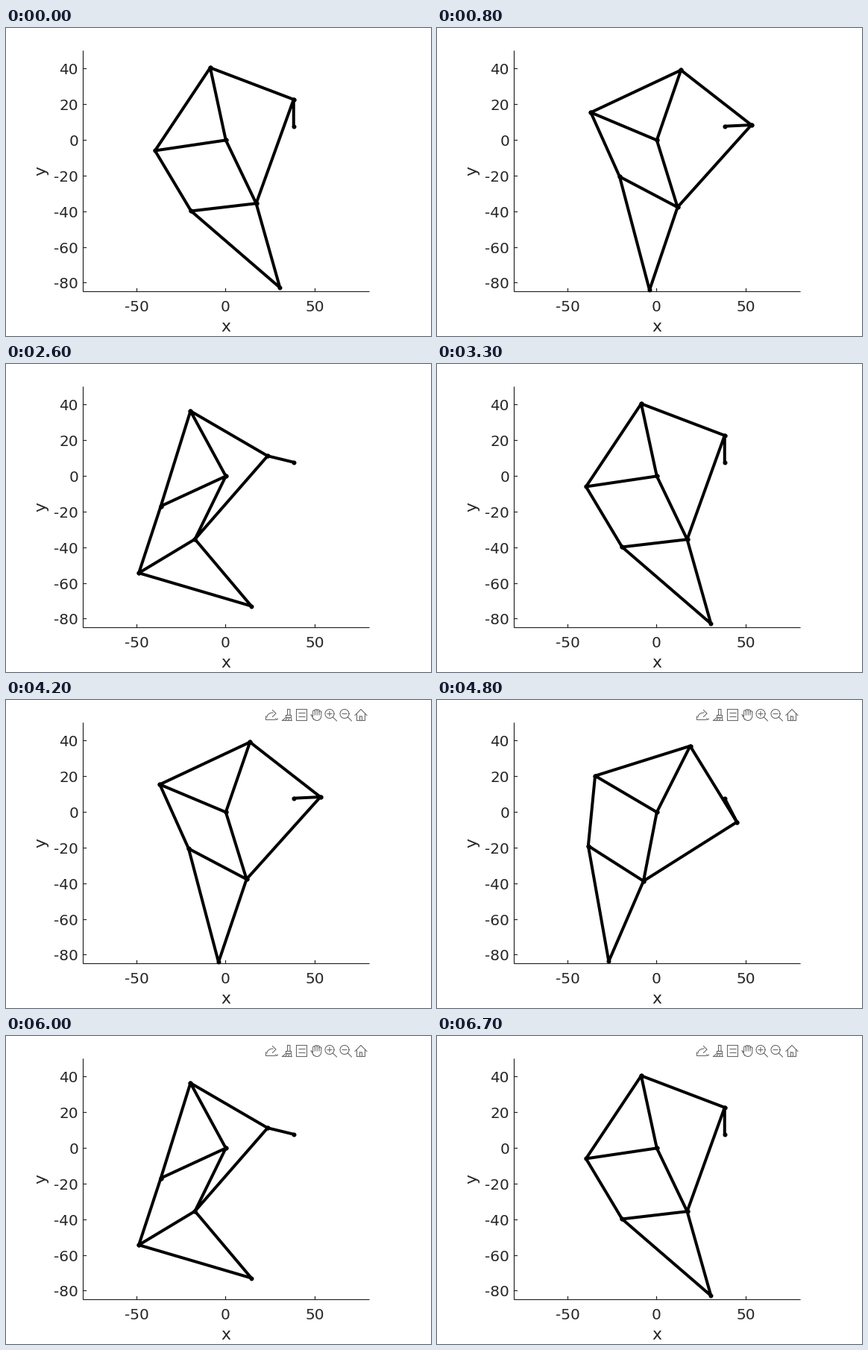
These frames come from a looping animation (570 px wide and 413 px high, 6800 ms). A matplotlib script:

```python
import numpy as np
import matplotlib.pyplot as plt
from matplotlib.animation import FuncAnimation

W, H, DPI = 570, 413, 100
PX = 72 / DPI                     # one pixel in points
X0, Y0, SCALE = 294.8, 150.4, 2.394
LEFT, RIGHT, TOP, BOTTOM = 103.5, 487, 31, 353.5
INK, ICON = "#262626", "#6a6a6a"
TURN = 34                         # steps per turn, both ends included

fig = plt.figure(figsize=(W / DPI, H / DPI), dpi=DPI, facecolor="white")
ax = fig.add_axes([0, 0, 1, 1])
ax.set_xlim(0, W)
ax.set_ylim(H, 0)
ax.axis("off")


def stroke(xs, ys, color=INK, width=1.2, **kw):
    return ax.plot(xs, ys, color=color, lw=width * PX, snap=False, **kw)[0]


def label(x, y, text, size=20, **kw):
    ax.text(x, y, text, color=INK, family="DejaVu Sans", fontsize=size * PX,
            va="baseline", **kw)


def draw_axes():
    stroke([LEFT, LEFT, RIGHT], [TOP, BOTTOM, BOTTOM],
           solid_joinstyle="miter")
    for v in (-50, 0, 50):
        x = np.floor(X0 + SCALE * v) + 0.5
        stroke([x, x], [BOTTOM, BOTTOM - 4])
        label(x, 380.5, str(v), ha="center")
    for v in range(-80, 41, 20):
        y = np.floor(Y0 - SCALE * v) + 0.5
        stroke([LEFT, LEFT + 4], [y, y])
        label(97, y + 7.3, str(v), ha="right")
    label(294.5, 407, "x", 22, ha="center")
    label(53, 192, "y", 22, ha="center", rotation=90, rotation_mode="anchor")


class Toolbar:
    """Row of line icons, each drawn around its own centre."""

    def __init__(self, x, y, step):
        self.x, self.y, self.parts = x, y, []
        for icon in (self.share, self.brush, self.note, self.hand,
                     self.zoom_in, self.zoom_out, self.home):
            icon()
            self.x += step

    def line(self, *pts):
        xs, ys = np.array(pts).T
        self.parts.append(stroke(self.x + xs, self.y + ys, ICON, 1.1))

    def box(self, l, t, r, b):
        self.line((l, t), (r, t), (r, b), (l, b), (l, t))

    def arc(self, x, y, rx, ry, start=0, end=360):
        t = np.radians(np.linspace(start, end, 40))
        self.line(*zip(x + rx * np.cos(t), y + ry * np.sin(t)))

    def share(self):
        self.line((-7.5, 2), (-7.5, 6.5), (5, 6.5))
        self.arc(2, 3, 8, 6, 180, 270)
        self.line((1.5, -6.5), (6, -2), (1.5, 2.5))
        self.line((5.5, 5), (7, 6.5), (8.5, 5))

    def brush(self):
        self.box(1.5, -7.5, 5, 0.5)
        self.box(-0.5, 0.5, 6.5, 3.5)
        for k in range(4):
            self.line((-0.5 + 2.2 * k, 3.5), (-5.5 + 4.2 * k, 7.5))
        self.line((-5.5, 7.5), (7.2, 7.5))

    def note(self):
        self.box(-6.5, -7.5, 7.5, 7.5)
        for y in (-2.5, 2.5):
            self.line((-3, y), (5, y))

    def hand(self):
        for k in range(4):
            x, y = -3 + 2.8 * k, -6.2 + 0.8 * (k - 1.3) ** 2
            self.arc(x, y, 1.4, 1.3, 180, 360)
            self.line((x + 1.4, y), (x + 1.4, 0))
        self.line((-4.4, -4), (-4.4, 2), (-7, -0.5), (-3.5, 6))
        self.arc(1, 1, 5.8, 6.5, 0, 140)

    def zoom_out(self):
        self.arc(-2, -1.5, 6, 6)
        self.line((2.3, 2.8), (7.5, 8))
        self.line((-5, -1.5), (1, -1.5))

    def zoom_in(self):
        self.zoom_out()
        self.line((-2, -4.5), (-2, 1.5))

    def home(self):
        self.line((-8, 0.5), (0, -7.5), (8, 0.5))
        self.line((-5.5, -1.5), (-5.5, 7.5), (5.5, 7.5), (5.5, -1.5))
        self.box(-1.5, 2, 1.5, 7.5)


def meet(p, r, q, s):
    """Crossing of circles (p, r) and (q, s) on the left of p -> q."""
    d = q - p
    n = np.hypot(*d)
    u = d / n
    a = (r * r - s * s + n * n) / (2 * n)
    return p + a * u + np.sqrt(r * r - a * a) * np.array([-u[1], u[0]])


PIVOT = np.array([38, 7.8])
ORIGIN = np.zeros(2)
GAP = np.full(2, np.nan)


def linkage(angle):
    crank = PIVOT + 15 * np.array([np.cos(angle), np.sin(angle)])
    top = meet(ORIGIN, 41.5, crank, 50)
    knee = meet(crank, 61.9, ORIGIN, 39.3)
    back = meet(ORIGIN, 40.1, top, 55.8)
    ankle = meet(knee, 36.7, back, 39.4)
    foot = meet(knee, 49, ankle, 65.7)
    pts = np.array([PIVOT, crank, top, back, ankle, foot, knee, crank, GAP,
                    top, ORIGIN, back, GAP, ORIGIN, knee, ankle])
    return X0 + SCALE * pts[:, 0], Y0 - SCALE * pts[:, 1]


draw_axes()
toolbar = Toolbar(356, 20, 20).parts
leg = stroke([], [], "black", 4, marker="o", markersize=6 * PX,
             markeredgewidth=0, solid_capstyle="round",
             solid_joinstyle="round", zorder=5)


def update(k):
    leg.set_data(*linkage(np.pi / 2 - 2 * np.pi * (k % TURN) / (TURN - 1)))
    for part in toolbar:
        part.set_visible(k >= TURN)
    return [leg, *toolbar]


anim = FuncAnimation(fig, update, frames=2 * TURN, interval=100,
                     repeat=True, repeat_delay=0)
plt.show()
```
